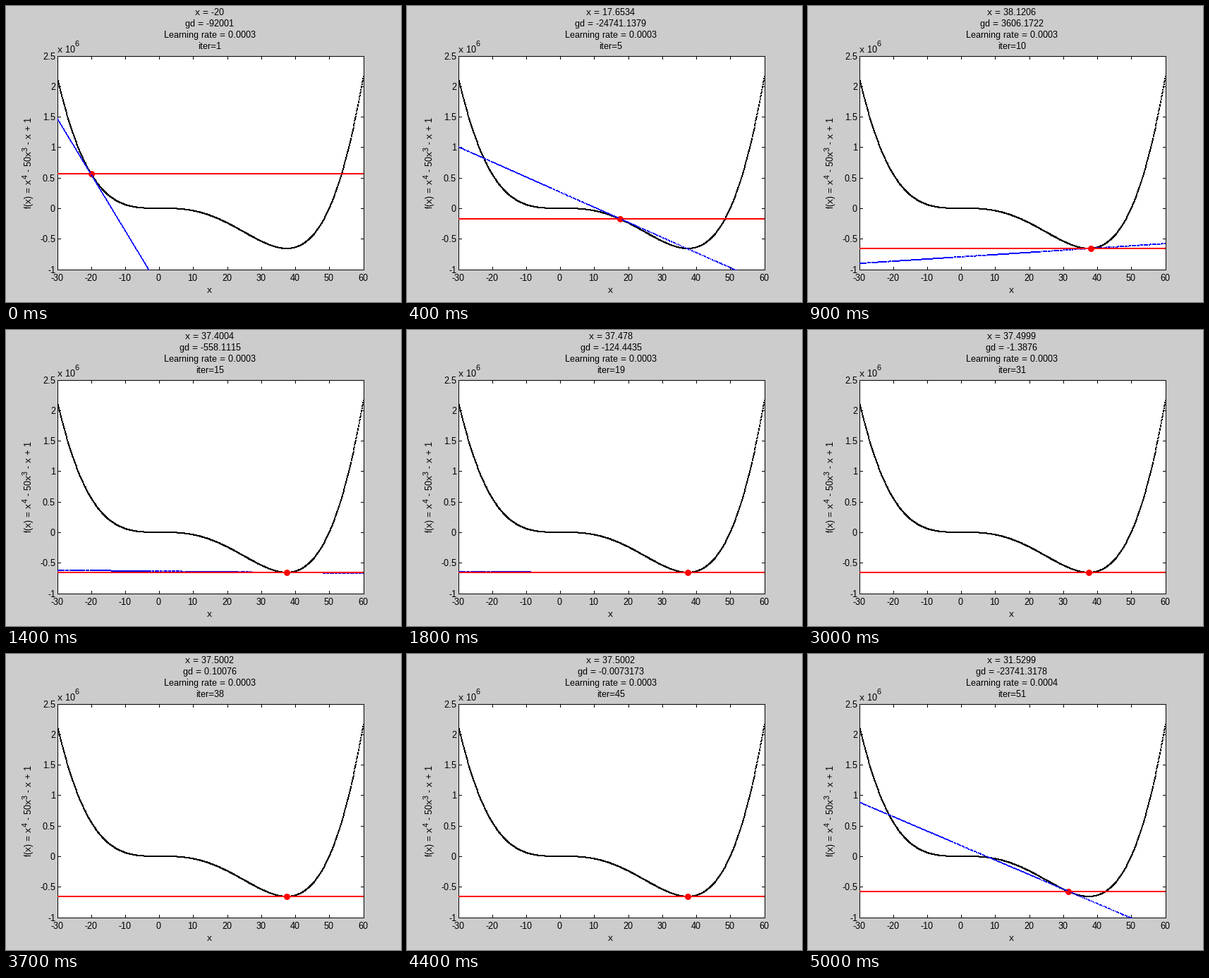
Animation of 560x420 px, one loop 5.1 s. Source, as a matplotlib script:

```python
import math

import matplotlib.pyplot as plt
import numpy as np
from matplotlib.animation import FuncAnimation
from matplotlib.collections import PolyCollection
from matplotlib.patches import Circle, Rectangle

W, H, DPI = 560, 420, 100
PX = 72 / DPI  # points per pixel
LEFT, RIGHT, TOP, BOTTOM = 73, 507, 71, 374
X_MIN, X_MAX, Y_MIN, Y_MAX = -30, 60, -1e6, 2.5e6
TICK = 5
STEPS = 51
SLOW_STEPS = 49  # the last steps come from the run with the higher rate

plt.rcParams.update({
    "font.family": "Liberation Sans",
    "font.size": 13 * PX,
    "text.hinting": "native",
    "text.hinting_factor": 1,
    "axes.unicode_minus": False,
})


def f(x):
    return x**4 - 50 * x**3 - x + 1


def slope(x):
    return 4 * x**3 - 150 * x**2 - 1


def descend(rate):
    xs = [-20.0]
    while len(xs) < STEPS:
        xs.append(xs[-1] - rate * slope(xs[-1]))
    return xs


def to_px(x):
    return np.floor(LEFT + (x - X_MIN) / (X_MAX - X_MIN) * (RIGHT - LEFT))


def to_py(y):
    return np.floor(TOP + (Y_MAX - y) / (Y_MAX - Y_MIN) * (BOTTOM - TOP))


def num(v):
    """Four decimals for large values, five significant digits for small."""
    whole = max(math.floor(math.log10(abs(v))) + 1, 1)
    return f"{v:.{whole + 4}g}"


fig = plt.figure(figsize=(W / DPI, H / DPI), dpi=DPI, facecolor="#cccccc")
ax = fig.add_axes([0, 0, 1, 1])
ax.set(xlim=(0, W), ylim=(H, 0))
ax.axis("off")

ax.add_patch(Rectangle((LEFT, TOP), RIGHT - LEFT, BOTTOM - TOP,
                       facecolor="white", edgecolor="black", lw=PX, zorder=1))
area = Rectangle((LEFT, TOP), RIGHT - LEFT, BOTTOM - TOP + 1,
                 transform=ax.transData)


def boxes(x, y, w, h):
    """Corners of pixel-aligned boxes whose top left corners are x, y."""
    x, y = np.broadcast_arrays(x, y)
    return np.stack([np.stack([x + dx, y + dy], axis=-1)
                     for dx, dy in ((0, 0), (w, 0), (w, h), (0, h))], axis=1)


def pixels(color, zorder, verts=(), clip=True):
    coll = PolyCollection(verts, facecolors=color, linewidths=0,
                          antialiaseds=False, zorder=zorder)
    ax.add_collection(coll, autolim=False)
    if clip:
        coll.set_clip_path(area)
    return coll


def label(x, y, s, ha="center", size=13, rotation=0):
    return ax.text(x, y, s, ha=ha, va="baseline", fontsize=size * PX,
                   rotation=rotation, rotation_mode="anchor", zorder=6)


# Ticks and their labels
x_ticks, y_ticks = np.arange(-30, 61, 10), np.arange(-1, 2.6, 0.5)
tick_x, tick_y = to_px(x_ticks), to_py(y_ticks * 1e6)
for edge in (TOP, BOTTOM + 1 - TICK):
    pixels("black", 1.5, boxes(tick_x, edge, 1, TICK), clip=False)
for edge in (LEFT, RIGHT + 1 - TICK):
    pixels("black", 1.5, boxes(edge, tick_y, TICK, 1), clip=False)
for x, v in zip(tick_x, x_ticks):
    label(x - 0.5, 390, str(v))
for y, v in zip(tick_y, y_ticks):
    label(70, y + 5, f"{v:g}", ha="right")

# Axis labels
label(288, 407, "x")
label(73, 66, "x 10", ha="left")
label(97, 57, "6", ha="left", size=11)
for y, part, raised in [(287, "f(x) = x", 0), (245, "4", 1),
                        (239, " - 50x", 0), (206, "3", 1),
                        (200, " - x + 1", 0)]:
    label(31 if raised else 36, y, part, ha="left",
          size=11 if raised else 13, rotation=90)

# The curve is a row of two-pixel dots
grid = np.linspace(X_MIN, X_MAX, 901)
pixels("black", 2, boxes(to_px(grid) - 1, to_py(f(grid)) - 1, 2, 2))

point = Circle((0, 0), 4.5, facecolor="red", lw=0, zorder=3)
ax.add_patch(point)
tangent = pixels("blue", 4)
level = pixels("red", 5)
titles = [label(289, 13 + 16 * i, "") for i in range(4)]
runs = {rate: descend(rate) for rate in (0.0003, 0.0004)}


def line_boxes(x, g):
    """Two-pixel-wide tangent at x, stepped along its longer direction."""
    ends = np.array([X_MIN, X_MAX])
    rise = abs(np.diff(to_py(f(x) + g * (ends - x)))[0])
    run = RIGHT - LEFT
    t = np.linspace(X_MIN, X_MAX, int(max(rise, run)) + 1)
    px, py = to_px(t), to_py(f(x) + g * (t - x))
    if rise > run:
        return boxes(px - 1, py, 2, 1)
    return boxes(px, py - 1, 1, 2)


def draw(i):
    rate = 0.0003 if i < SLOW_STEPS else 0.0004
    x = runs[rate][i]
    g = slope(x)
    px, py = to_px(x), to_py(f(x))
    point.center = (px + 0.5, py + 0.5)
    tangent.set_verts(line_boxes(x, g))
    level.set_verts(boxes([LEFT], [py - 1], RIGHT - LEFT, 2))
    lines = (f"x = {num(x)}", f"gd = {num(g)}",
             f"Learning rate = {rate}", f"iter={i + 1}")
    for text, s in zip(titles, lines):
        text.set_text(s)
    return [point, tangent, level, *titles]


anim = FuncAnimation(fig, draw, frames=STEPS, interval=100, repeat=True,
                     repeat_delay=0, blit=False)
plt.show()
```
